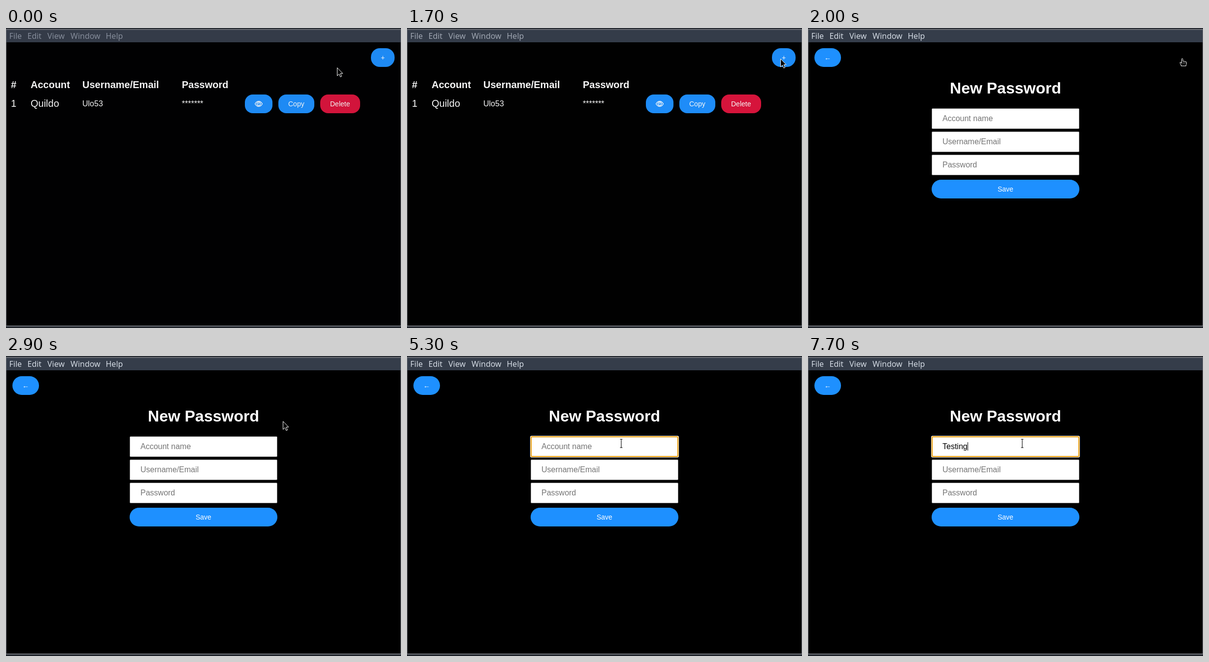
Recreate the animation shown at these times as an HTML page. Size 802 by 609 pixels, loop 8000 ms.

```html
<!DOCTYPE html>
<html lang="en">
<head>
<meta charset="utf-8">
<title>Password manager</title>
<style>
  html, body { margin: 0; width: 100%; height: 100%; overflow: hidden; background: #22262d; }
  svg { display: block; width: 802px; height: 609px; }
  text { font: 16px "Liberation Sans", Arial, sans-serif; fill: #fff; white-space: pre; }
  .menu text { font: 16px "Noto Sans", sans-serif; fill: inherit; }
  .head text { font-size: 20px; font-weight: bold; }
  .big { font-size: 20px; }
  .title { font-size: 32px; font-weight: bold; }
  .button text { font-size: 14px; }
  .button rect { fill: #1e90ff; }
  .button .red { fill: #dc143c; }
  .field { fill: #fff; stroke: #767676; }
  .hint text { fill: #757575; }
  #typed { fill: #000; }
  .pointer { fill: #000; stroke: #fff; stroke-linejoin: round; }
</style>
</head>
<body>
<svg viewBox="0 0 802 609">
  <g id="window">
    <rect y="2" width="802" height="604" fill="#6c6f76"/>
    <rect x="1" y="4" width="800" height="600"/>
    <rect x="1" y="4" width="800" height="25" fill="#353d4a"/>
    <g class="menu" id="menu">
      <text x="6.5" y="22">File</text>
      <text x="43.5" y="22">Edit</text>
      <text x="84" y="22">View</text>
      <text x="131" y="22">Window</text>
      <text x="202.5" y="22">Help</text>
    </g>

    <g id="list">
      <g class="head">
        <text x="10" y="122">#</text>
        <text x="50" y="122">Account</text>
        <text x="155" y="122">Username/Email</text>
        <text x="357" y="122">Password</text>
      </g>
      <text class="big" x="10" y="160">1</text>
      <text class="big" x="50" y="160">Quildo</text>
      <text x="155" y="159">Ulo53</text>
      <text x="357" y="159">*******</text>
      <g class="button">
        <rect x="741" y="41" width="48" height="38" rx="18"/>
        <text x="761" y="65">+</text>
        <rect x="485" y="135" width="56" height="38" rx="16"/>
        <rect x="553" y="135" width="73" height="38" rx="16"/>
        <text x="573" y="159">Copy</text>
        <rect class="red" x="638" y="135" width="81" height="38" rx="16"/>
        <text x="658" y="159">Delete</text>
      </g>
      <g fill="none" stroke="#fff" stroke-width="1.4">
        <path d="M505.6 154Q508.400 148.800 513 148.800T520.400 154Q517.600 159.200 513 159.200T505.600 154Z"/>
        <circle cx="513" cy="154" r="3.5"/>
        <path d="M511.600 154.200A1.600 1.600 0 0 0 513.200 152.400"/>
      </g>
    </g>

    <g id="form">
      <g class="button">
        <rect x="13" y="41" width="54" height="38" rx="19"/>
        <text x="33" y="65">←</text>
        <rect x="251" y="308" width="300" height="38" rx="19"/>
        <text x="385" y="332">Save</text>
      </g>
      <text class="title" x="401" y="133" text-anchor="middle">New Password</text>
      <rect class="field" id="account" x="251.5" y="163.500" width="299" height="41" rx="1.500"/>
      <rect class="field" x="251.5" y="210.500" width="299" height="41" rx="1.500"/>
      <rect class="field" x="251.5" y="257.500" width="299" height="41" rx="1.500"/>
      <g id="ring">
        <rect x="250" y="162" width="302" height="44" rx="3" fill="#fff"/>
        <rect x="252" y="164" width="298" height="40" rx="1.500" fill="#fff" stroke="#e59700" stroke-width="2"/>
      </g>
      <g class="hint">
        <text id="hint" x="273" y="189">Account name</text>
        <text x="273" y="236">Username/Email</text>
        <text x="273" y="283">Password</text>
      </g>
      <text id="typed" x="273" y="189"></text>
      <rect id="caret" y="175" width="1" height="17"/>
    </g>
  </g>

  <g id="cursor">
    <path id="arrow" class="pointer" d="M.5 .7V17L4.400 13.400 6.900 19.300 9.500 18.200 7 12.300H11.800Z"/>
    <g id="hand" class="pointer">
      <path d="M.5 10V1.500Q.5 .1 1.800 .1T3.100 1.500V5.400L9 6.300Q10.500 6.700 10.500 8.300V11.300L9.500 12.300V15H-.5V13L-2.500 9.500V7.600H-1.200L.5 9.500"/>
      <path d="M3.500 8V10M5.900 8V10M8.200 8.300V10" stroke-width=".7"/>
    </g>
    <g id="beam" fill="none">
      <path d="M-3-8.500H3M0-8.500V8.500M-3 8.500H3" stroke="#fff" stroke-width="3"/>
      <path d="M-2.500-8.500H-.5L0-7.500 .5-8.500H2.500M0-8V8M-2.500 8.500H-.5L0 7.500 .5 8.500H2.500" stroke="#000" stroke-width="1.100"/>
    </g>
  </g>
</svg>
<script>
const LOOP = 8000;
const el = id => document.getElementById(id);
const show = (id, on) => { el(id).style.display = on ? "" : "none"; };
const clamp = v => Math.min(1, Math.max(0, v));
const mix = (a, b, p) => a + (b - a) * p;
const ease = p => p * p * (3 - 2 * p);

const word = "Testing";
const keyTimes = [6700, 6900, 7100, 7200, 7300, 7500, 7700];
const rest = [672, 80], plus = [758, 62], field = [435, 178];

// Pointer position, sampled in steps of 100 ms
function pointerAt(t) {
  const late = t >= 2600;
  const [from, to] = late ? [plus, field] : [rest, plus];
  const p = ease(late ? clamp((t - 2500) / 700) : clamp((t - 100) / 800));
  return from.map((v, i) => Math.round(mix(v, to[i], p)));
}

function draw(time) {
  const t = Math.floor(time / 100) * 100;
  const onForm = t >= 2000;
  const focused = t >= 3500;

  const active = clamp((t - 1600) / 300);
  el("window").style.opacity = mix(0.95, 1, active);
  const grey = [[139, 211], [146, 218], [160, 227]].map(([a, b]) => Math.round(mix(a, b, active)));
  el("menu").style.fill = `rgb(${grey})`;
  show("list", !onForm);
  show("form", onForm);

  const [x, y] = pointerAt(t);
  const overField = onForm && x > 251 && x < 551 && y > 163 && y < 205;
  const overPlus = !onForm && x > 741 && y < 79 && t < 1700;
  const hand = overPlus || (onForm && t < 2600);
  el("cursor").setAttribute("transform", `translate(${x} ${y})`);
  show("beam", overField);
  show("hand", hand);
  show("arrow", !overField && !hand);
  if (overField) el("cursor").setAttribute("transform", `translate(${x} ${y - 0.5})`);

  el("account").style.stroke = overField ? "#4f4f4f" : "";
  show("ring", focused);

  const count = keyTimes.filter(k => t >= k).length;
  const typed = el("typed");
  typed.textContent = word.slice(0, count);
  show("hint", count === 0);
  const blink = Math.floor((t - 3500) / 600) % 2 === 0;
  show("caret", focused && (count > 0 || blink));
  const width = count ? typed.getComputedTextLength() : 0;
  el("caret").setAttribute("x", Math.round(273 + width));
}

const start = performance.now();
function tick() {
  draw((performance.now() - start) % LOOP);
  requestAnimationFrame(tick);
}
tick();
</script>
</body>
</html>
```
